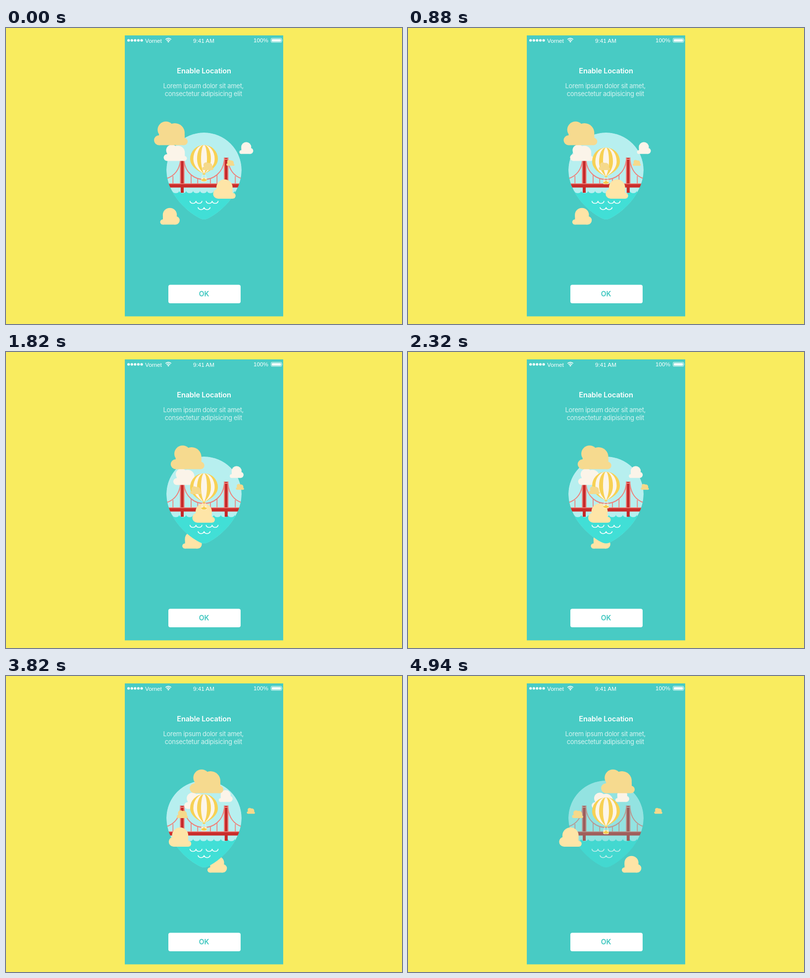
Write an HTML page that moves like this. It is 800 by 600 pixels and loops after 4.98 s.

```html
<!DOCTYPE html>
<html lang="en">
<head>
<meta charset="utf-8">
<title>Enable Location</title>
<style>
  html, body { margin: 0; width: 100%; height: 100%; overflow: hidden; background: #f9ec5f; }
  svg { display: block; width: 800px; height: 600px; }
  text { fill: #fff; }
  .status { font: 11.7px "Liberation Sans", Arial, sans-serif; }
  .title { font: 600 14.5px Inter, sans-serif; letter-spacing: -.15px; text-anchor: middle; }
  .body { font: 13px Inter, sans-serif; letter-spacing: -.3px; text-anchor: middle; fill: #d6f3f1; }
  .ok { font: 600 14px Inter, sans-serif; text-anchor: middle; fill: #3ac5be; }
  .line { fill: none; stroke: #fff; stroke-width: 1.6; }
  .cable { fill: none; stroke: #ee827b; stroke-width: 2; }
</style>
</head>
<body>
<svg viewBox="0 0 800 600">
  <defs>
    <g id="double">
      <circle cx="24" cy="16.7" r="16.7"/>
      <circle cx="42" cy="23.5" r="20"/>
      <circle cx="10" cy="38" r="10"/>
      <circle cx="60.5" cy="40.5" r="7.5"/>
      <path d="M10 26H62V41L60.5 48H10Z"/>
    </g>
    <g id="single">
      <circle cx="23" cy="16.4" r="16.4"/>
      <circle cx="10" cy="29" r="10"/>
      <circle cx="39.5" cy="33" r="6"/>
      <path d="M10 22L39.2 18V39H10Z"/>
    </g>
    <path id="pinShape" d="M400 212A76 76 0 0 1 476 288C476 331 440 370 408 386Q400 390 392 386C360 370 324 331 324 288A76 76 0 0 1 400 212Z"/>
    <clipPath id="pinClip"><use href="#pinShape"/></clipPath>
    <path id="ripple" class="line" d="M0 0a6.1 5 0 0 0 12.2 0a6.1 5 0 0 0 12.2 0"/>
    <g id="tower">
      <path d="M-3 0H3V71H-3Z" fill="#c4292a" transform="translate(0 263)"/>
      <path class="cable" d="M-3.6 262.5V316M3.6 262.5V316M-3.6 266H3.6" stroke-width="1.4"/>
    </g>
  </defs>

  <rect width="800" height="600" fill="#f9ec5f"/>
  <rect x="240" y="15" width="320" height="569.5" fill="#48cbc4"/>

  <g id="dots" fill="#fff"></g>
  <text class="status" x="281" y="29.5">Vornet</text>
  <path class="line" d="M322.3 23.2Q328 18.6 333.7 23.2M324.4 25.6Q328 22.6 331.6 25.6"/>
  <path d="M325.9 27.2Q328 25.4 330.1 27.2L328 29.4Z" fill="#fff"/>
  <text class="status" x="378" y="29.5">9:41 AM</text>
  <text class="status" x="500" y="29.2">100%</text>
  <rect x="535.5" y="20.9" width="21.4" height="8" rx="1.6" class="line" style="stroke-width:.9"/>
  <rect x="537" y="22.4" width="18.4" height="5" rx=".6" fill="#fff"/>
  <path d="M557.6 23.3q1.6 1.6 0 3.2Z" fill="#fff"/>

  <text class="title" x="400" y="92">Enable Location</text>
  <text class="body" x="398.8" y="122">Lorem ipsum dolor sit amet,</text>
  <text class="body" x="398.8" y="138">consectetur adipisicing elit</text>

  <g id="back"></g>
  <g id="pin" clip-path="url(#pinClip)">
    <use href="#pinShape" fill="#b7efef"/>
    <path id="sea" fill="#41dfd6"/>
    <path class="cable" d="M322 306Q349 298 352.5 268M359.5 268C362 295 382 307 400 307S438 295 441 268M448.5 268Q452 298 478 306"/>
    <path class="cable" style="stroke-width:1.7" d="M337.3 300V316M374 297V316M387.3 304V316M413 304V316M426.3 297V316M463.3 300V316"/>
    <use href="#tower" x="356"/>
    <use href="#tower" x="444.8"/>
    <rect x="320" y="316" width="160" height="7.4" fill="#ca2d2b"/>
    <rect x="320" y="314.9" width="160" height="1.6" fill="#ee827b"/>
    <use href="#ripple" x="371.6" y="350.5"/>
    <use href="#ripple" x="404.2" y="350.5"/>
    <use href="#ripple" x="388" y="363.2"/>
  </g>
  <g id="middle"></g>
  <g id="balloon">
    <path class="line" style="stroke:#fcf3dc;stroke-width:1" d="M-2.2 59L-4.6 67M2.2 59L4.6 67"/>
    <g id="stripes"></g>
    <rect x="-2.8" y="57.6" width="5.6" height="2.4" rx="1" fill="#f7d154"/>
    <rect x="-5.6" y="66" width="11.2" height="8.2" rx="1.6" fill="#fbeecb"/>
    <path d="M-5.6 70L-2 69L0 66.2L2 69L5.6 70V71.6L2.4 73.4H-2.4L-5.6 71.6Z" fill="#f5cb4b"/>
  </g>
  <g id="front"></g>

  <rect x="328" y="520.5" width="146" height="37.5" rx="4" fill="#fff"/>
  <text class="ok" x="400" y="544.3">OK</text>
</svg>
<script>
  const LOOP = 4980, LAST = 138;
  const $ = id => document.getElementById(id);

  function add(parent, tag, attrs) {
    const el = document.createElementNS('http://www.w3.org/2000/svg', tag);
    for (const key in attrs) el.setAttribute(key, attrs[key]);
    return $(parent).appendChild(el);
  }

  for (let i = 0; i < 5; i++) add('dots', 'circle', { cx: 247.6 + i * 6.6, cy: 25, r: 2.6 });

  $('sea').setAttribute('d', 'M322 330' + 'a7 4.8 0 0 0 14 0'.repeat(12) + 'V392H322Z');

  // Nested gores, widest first
  [28, 21.5, 14, 6].forEach((w, i) => add('stripes', 'path', {
    d: `M0 0A${w} 28 0 0 1 ${w} 28C${w} 43 ${w * .45} 53 0 58C${-w * .45} 53 ${-w} 43 ${-w} 28A${w} 28 0 0 1 0 0Z`,
    fill: i % 2 ? '#fcf5e9' : '#f7d154'
  }));

  // layer, shape, colour, scale, top, start x, end x, mirrored
  const clouds = [
    ['back', 'single', '#fee4a6', .865, 364.7, 311.5, 432, true],
    ['middle', 'double', '#f5d98b', .243, 267.6, 445, 497.3],
    ['middle', 'double', '#fbf4e9', .69, 236.4, 318.5, 371],
    ['middle', 'single', '#fbf4e9', .615, 231.2, 471.5, 419, true],
    ['middle', 'double', '#f6da8f', 1, 189.5, 299, 390],
    ['middle', 'single', '#fee5a7', 1, 307, 418.4, 305.3],
    ['front', 'double', '#f5d98b', .33, 272.2, 396.5, 331.5]
  ].map(([layer, shape, fill, scale, top, from, to, flip]) => ({
    el: add(layer, 'use', { href: '#' + shape, fill }),
    top, from, to,
    shift: flip ? 45.5 * scale : 0,
    size: `scale(${flip ? -scale : scale} ${scale})`
  }));

  // Drift: share of the loop -> share of the path
  const drift = [[0, 0], [.181, .169], [.261, .253], [.471, .481], [.601, .615], [.775, .792], [1, 1]];

  function progress(u) {
    const i = Math.max(1, drift.findIndex(p => p[0] >= u));
    const [a, b] = drift[i - 1], [c, d] = drift[i];
    return b + (d - b) * (u - a) / (c - a);
  }

  // Steps last 20, 40, 40, 40, 40 ms
  function stepAt(t) {
    const k = Math.floor((t - 20) / 180), r = t - 20 - k * 180;
    return Math.min(LAST, 5 * k + 1 + (r < 20 ? 0 : 1 + Math.floor((r - 20) / 40)));
  }

  function draw(now) {
    const n = stepAt(now % LOOP);
    const p = progress(n / LAST);
    for (const c of clouds) {
      const x = c.from + (c.to - c.from) * p + c.shift;
      c.el.setAttribute('transform', `translate(${x} ${c.top}) ${c.size}`);
    }
    const bob = 237.2 + 4.5 * (1 - Math.cos(Math.PI * n / 45.5));
    $('balloon').setAttribute('transform', `translate(400 ${bob})`);
    $('pin').setAttribute('opacity', 1 - Math.max(0, n - 133) * .064);
  }

  const start = performance.now();
  function tick() {
    draw(performance.now() - start);
    requestAnimationFrame(tick);
  }
  tick();
</script>
</body>
</html>
```
